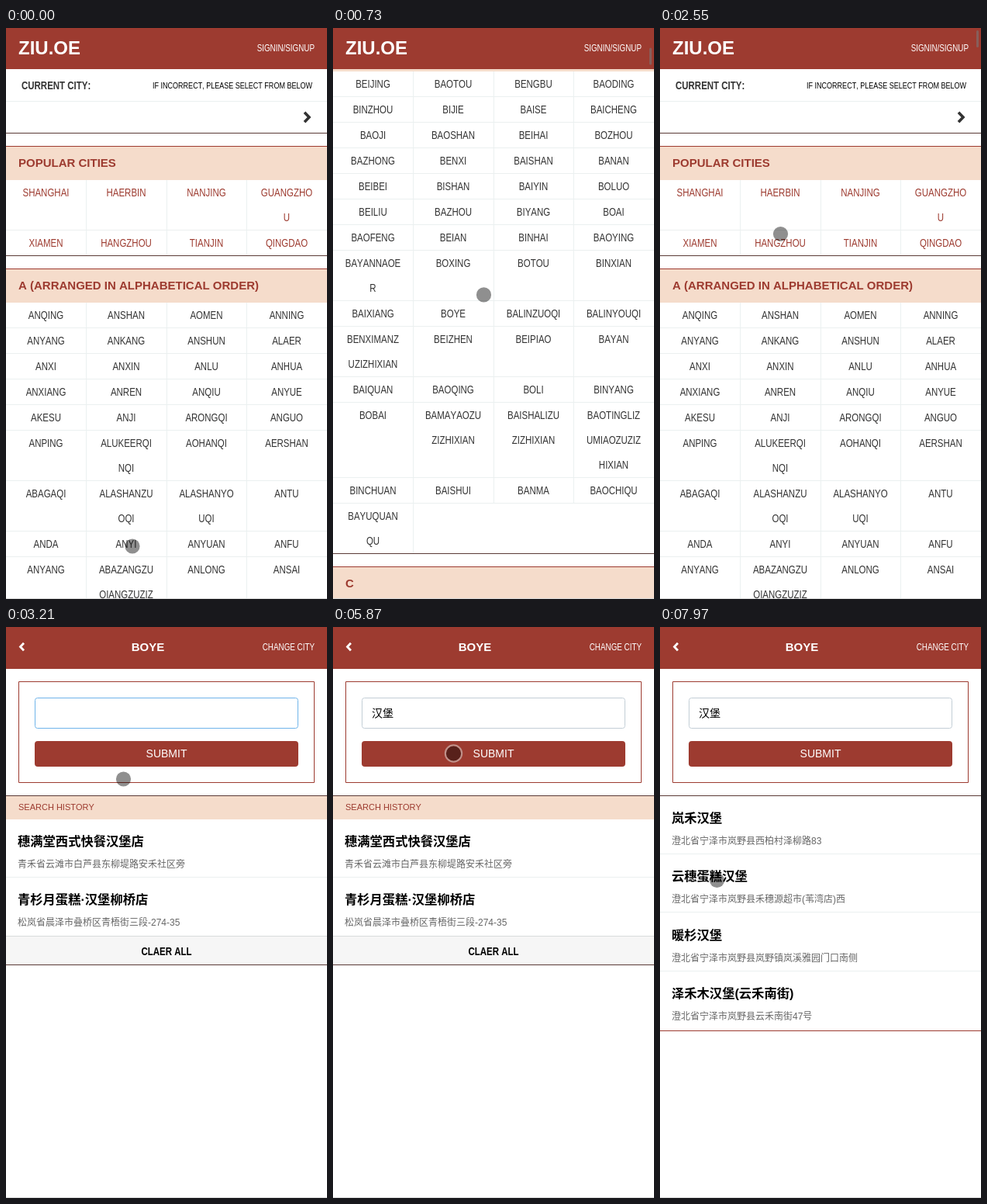
An HTML page with a canvas for the animation above (8000 ms loop, 414 px wide and 736 px high).

```html
<!DOCTYPE html>
<html lang="zh-CN">
<head>
<meta charset="utf-8">
<title>City search</title>
<style>
html, body { margin: 0; width: 100%; height: 100%; overflow: hidden; background: #fff; }
canvas { display: block; width: 414px; height: 736px; }
</style>
</head>
<body>
<canvas></canvas>
<script>
const W = 414, H = 736, LOOP = 8000;
const RED = '#9d3b30', PEACH = '#f5dccb', DARK = '#5a3a36', HAIR = '#ebf0f0', INK = '#333';
const FONT = '"Liberation Sans", "Noto Sans CJK SC", "Noto Sans CJK", sans-serif';
const NARROW = 0.82;      // condensed face used for small labels
const CELL_TEXT = 72.6;   // usable text width of a city cell

const canvas = document.querySelector('canvas');
const ctx = canvas.getContext('2d');
const dpr = window.devicePixelRatio || 1;
canvas.width = W * dpr;
canvas.height = H * dpr;
ctx.scale(dpr, dpr);
ctx.fontKerning = 'none';

function rect(x, y, w, h, color) {
  ctx.fillStyle = color;
  ctx.fillRect(x, y, w, h);
}

function rounded(x, y, w, h, r, fill, stroke) {
  ctx.beginPath();
  ctx.roundRect(x, y, w, h, r);
  if (fill) { ctx.fillStyle = fill; ctx.fill(); }
  if (stroke) { ctx.strokeStyle = stroke; ctx.lineWidth = 1; ctx.stroke(); }
}

function setFont(size, weight = 400) {
  ctx.font = `${weight} ${size}px ${FONT}`;
}

function text(str, x, y, size, color, { weight = 400, align = 'left', narrow = false } = {}) {
  ctx.save();
  ctx.translate(x, y);
  if (narrow) ctx.scale(NARROW, 1);
  setFont(size, weight);
  ctx.textAlign = align;
  ctx.fillStyle = color;
  ctx.fillText(str, 0, 0);
  ctx.restore();
}

function chevron(x, y, dx, dy, width, color) {
  ctx.beginPath();
  ctx.moveTo(x - dx, y - dy);
  ctx.lineTo(x, y);
  ctx.lineTo(x - dx, y + dy);
  ctx.lineWidth = width;
  ctx.strokeStyle = color;
  ctx.stroke();
}

// ---- city list ----
const cityData = [
  ['POPULAR CITIES', `SHANGHAI HAERBIN NANJING GUANGZHOU XIAMEN HANGZHOU TIANJIN QINGDAO`],
  ['A (ARRANGED IN ALPHABETICAL ORDER)', `ANQING ANSHAN AOMEN ANNING ANYANG ANKANG ANSHUN ALAER
    ANXI ANXIN ANLU ANHUA ANXIANG ANREN ANQIU ANYUE AKESU ANJI ARONGQI ANGUO
    ANPING ALUKEERQINQI AOHANQI AERSHAN ABAGAQI ALASHANZUOQI ALASHANYOUQI ANTU
    ANDA ANYI ANYUAN ANFU ANYANG ABAZANGZUQIANGZUZIZHIXIAN ANLONG ANSAI
    ANDING ANZE ANHUA ANCI`],
  ['B', `BEIJING BAOTOU BENGBU BAODING BINZHOU BIJIE BAISE BAICHENG BAOJI BAOSHAN BEIHAI BOZHOU
    BAZHONG BENXI BAISHAN BANAN BEIBEI BISHAN BAIYIN BOLUO BEILIU BAZHOU BIYANG BOAI
    BAOFENG BEIAN BINHAI BAOYING BAYANNAOER BOXING BOTOU BINXIAN
    BAIXIANG BOYE BALINZUOQI BALINYOUQI BENXIMANZUZIZHIXIAN BEIZHEN BEIPIAO BAYAN
    BAIQUAN BAOQING BOLI BINYANG BOBAI BAMAYAOZUZIZHIXIAN BAISHALIZUZIZHIXIAN
    BAOTINGLIZUMIAOZUZIZHIXIAN BINCHUAN BAISHUI BANMA BAOCHIQU BAYUQUANQU`],
  ['C', `CHENGDU CHIFENG CHAOYANG CHANGCHUN CHANGSHA CHONGQING CHANGZHOU CHUZHOU`],
];

function wrap(word) {
  const lines = [''];
  for (const ch of word) {
    const last = lines.length - 1;
    if (ctx.measureText(lines[last] + ch).width * NARROW > CELL_TEXT) lines.push(ch);
    else lines[last] += ch;
  }
  return lines;
}

function layoutSections() {
  setFont(14);
  let y = 152;
  return cityData.map(([title, names]) => {
    const section = { title, y, rows: [] };
    const words = names.split(/\s+/);
    y += 44;
    for (let i = 0; i < words.length; i += 4) {
      const cells = words.slice(i, i + 4).map(wrap);
      const height = 32 * Math.max(...cells.map(c => c.length)) + 1;
      section.rows.push({ y, height, cells });
      y += height;
    }
    section.end = y - 1;
    y += 16;
    return section;
  });
}
const sections = layoutSections();

function drawSection({ title, y, rows, end }, index) {
  rect(0, y, W, 1, RED);
  rect(0, y + 1, W, 43, PEACH);
  text(title, 16, y + 27, 15, RED, { weight: 700 });
  for (const row of rows) {
    rect(0, row.y + row.height - 1, W, 1, HAIR);
    row.cells.forEach((lines, col) => {
      if (col < 3) rect(Math.floor(103.5 * (col + 1)), row.y, 1, row.height, HAIR);
      lines.forEach((line, n) => text(line, 103.5 * col + 51.5, row.y + 21 + 32 * n, 14,
        index ? INK : RED, { align: 'center', narrow: true }));
    });
  }
  rect(0, end, W, 1, DARK);
}

function drawListPage(scroll, showBar) {
  rect(0, 0, W, H, '#fff');
  ctx.save();
  ctx.translate(0, -scroll);
  text('CURRENT CITY:', 20, 79, 14, INK, { weight: 700, narrow: true });
  text('IF INCORRECT, PLEASE SELECT FROM BELOW', 395, 78, 11, '#000', { align: 'right', narrow: true });
  rect(0, 94, W, 1, HAIR);
  chevron(391, 115, 6, 6.3, 3.6, INK);
  rect(0, 135, W, 1, DARK);
  sections.forEach(drawSection);
  ctx.restore();
  rect(0, 0, W, 53, RED);
  text('ZIU.OE', 16, 34, 24, '#fff', { weight: 700 });
  text('SIGNIN/SIGNUP', 398, 30, 12, '#fff', { align: 'right', narrow: true });
  if (showBar) rounded(408, 3 + scroll * 0.0275, 3, 22, 1.5, 'rgba(120,120,120,.6)');
}

// ---- search page ----
const history = [
  ['穗满堂西式快餐汉堡店', '青禾省云滩市白芦县东柳堤路安禾社区旁'],
  ['青杉月蛋糕·汉堡柳桥店', '松岚省晨泽市叠桥区青梧街三段-274-35'],
];
const results = [
  ['岚禾汉堡', '澄北省宁泽市岚野县西柏村泽柳路83'],
  ['云穗蛋糕汉堡', '澄北省宁泽市岚野县禾穗源超市(苇湾店)西'],
  ['暖杉汉堡', '澄北省宁泽市岚野县岚野镇岚溪雅园门口南侧'],
  ['泽禾木汉堡(云禾南街)', '澄北省宁泽市岚野县云禾南街47号'],
];
// time, composed letters, suggestions
const typing = [
  [3580, 'h', '好 和 会 还 后 很'],
  [3740, 'ha', '哈 蛤 铪 虾 呵 嗨'],
  [3890, 'han', '汉 喊 含 寒 韩 汗'],
  [4200, "han'b", '汉堡 韩版 寒冰 韩币 韩波'],
  [4350, "han'ba", '汉堡 韩版 喊吧 旱坝 韩巴'],
  [4510, "han'bao", '汉堡 汉宝 含苞 韩宝 旱保'],
];
const COMMIT = 4740;

function drawShops(shops, top) {
  shops.forEach(([name, address], i) => {
    const y = top + Math.round(75.3 * i);
    text(name, 15, y + 35, 16.3, '#000', { weight: 700 });
    text(address, 15, y + 62.5, 12, '#666');
    if (i < shops.length - 1) rect(0, y + 75, W, 1, HAIR);
  });
}

function drawSuggestions(left, words) {
  rect(left, 122, W, 48, INK);
  rect(left + 2, 124, W, 44, '#fff');
  let x = left + 2;
  words.split(' ').forEach((word, i) => {
    setFont(19.5);
    const width = ctx.measureText(word).width;
    if (!i) rect(x, 124, width + 40, 44, '#8acb05');
    text(i + 1, x + 14, 153, 15, i ? '#666' : '#fff');
    text(word, x + 26, 153, 19.5, i ? '#000' : '#fff');
    x += width + 44;
  });
}

function drawInput(t) {
  const focused = t < 5730;
  rounded(37.5, 91.5, 339, 39, 3, '#fff', focused ? '#6fb4ea' : '#c3ced6');
  const step = typing.findLast(([start]) => t >= start);
  const composing = step && t < COMMIT;
  const value = composing ? step[1] : t >= COMMIT ? '汉堡' : '';
  text(value, 50, 116, 14, '#000');
  setFont(14);
  const caret = 50 + Math.floor(ctx.measureText(value).width);
  if (composing) rect(50, 118, caret - 50, 1, '#000');
  if (t >= 3440 && t < 5280) rect(caret, 103, 1, 16, '#000');
  if (composing) drawSuggestions(caret - 2, step[2]);
}

function drawSearchPage(t) {
  rect(0, 0, W, H, '#fff');
  rect(0, 0, W, 54, RED);
  chevron(18.5, 25.5, -4.5, 4.8, 2.8, '#fff');
  text('BOYE', 183, 31, 15, '#fff', { weight: 700, align: 'center' });
  text('CHANGE CITY', 398, 30, 12, '#fff', { align: 'right', narrow: true });

  rounded(16.5, 70.5, 381, 130, 0, null, RED);
  rounded(37, 147, 340, 33, 4, RED);
  text('SUBMIT', 207, 168, 14, '#fff', { align: 'center' });
  rect(0, 217, W, 1, DARK);
  if (t < 6490) {
    rect(0, 218, W, 30, PEACH);
    text('SEARCH HISTORY', 16, 236, 11, RED);
    drawShops(history, 247);
    rect(0, 399, W, 36, '#f6f6f6');
    rect(0, 398, W, 1, '#d8dcdc');
    text('CLAER ALL', 207, 423, 14, '#000', { weight: 700, align: 'center', narrow: true });
    rect(0, 435, W, 1, DARK);
  } else {
    drawShops(results, 217);
    rect(0, 520, W, 1, RED);
  }
  drawInput(t);
}

// ---- pointer ----
const pointerPath = [
  [0, 163, 668], [60, 163, 668], [140, 158.5, 672.5], [300, 158.5, 672.5], [730, 194.5, 344],
  [1030, 185.5, 317], [1090, 171.5, 291.5], [1310, 152.5, 256], [1470, 152, 259],
  [1610, 155.5, 265.5], [2600, 155.5, 265.5], [3210, 151.5, 196], [5200, 151.5, 196],
  [5500, 155.5, 163], [6900, 155.5, 163], [7070, 164, 200], [7450, 118, 384],
  [7750, 76, 329], [7830, 75, 328], [7970, 73.5, 326.5], [8000, 73.5, 326.5],
];
const presses = [[1470, 1610], [5500, 6950], [7830, 7970]];

function drawPointer(t) {
  const next = pointerPath.findIndex(([time]) => time > t);
  const [t0, x0, y0] = pointerPath[next - 1];
  const [t1, x1, y1] = pointerPath[next];
  const p = (t - t0) / (t1 - t0);
  const x = x0 + (x1 - x0) * p, y = y0 + (y1 - y0) * p;
  ctx.beginPath();
  ctx.arc(x, y, 9.6, 0, 7);
  ctx.fillStyle = 'rgba(0,0,0,.44)';
  ctx.fill();
  if (presses.some(([from, to]) => t >= from && t < to)) {
    ctx.beginPath();
    ctx.arc(x, y, 10.7, 0, 7);
    ctx.lineWidth = 2;
    ctx.strokeStyle = 'rgba(215,205,200,.6)';
    ctx.stroke();
  }
}

// ---- timeline ----
const progress = (t, from, to) => Math.min(1, Math.max(0, (t - from) / (to - from)));

function scrollAt(t) {
  if (t >= 2550) return 0;
  return Math.round(914 * (1 - (1 - progress(t, 300, 1030)) ** 2.5));
}

function shifted(dx, draw) {
  ctx.save();
  ctx.beginPath();
  ctx.translate(Math.round(dx), 0);
  ctx.rect(0, 0, W, H);
  ctx.clip();
  draw();
  ctx.restore();
}

function frame() {
  const t = performance.now() % LOOP;
  const slide = 1 - (1 - progress(t, 2650, 3150)) ** 2;
  const barVisible = (t >= 300 && t < 1610) || t >= 2550;
  if (slide < 1) shifted(-W * slide, () => drawListPage(scrollAt(t), barVisible));
  if (slide > 0) shifted(W * (1 - slide), () => drawSearchPage(t));
  rect(0, 735, W, 1, '#d9d9d9');
  drawPointer(t);
  requestAnimationFrame(frame);
}
frame();
</script>
</body>
</html>
```
